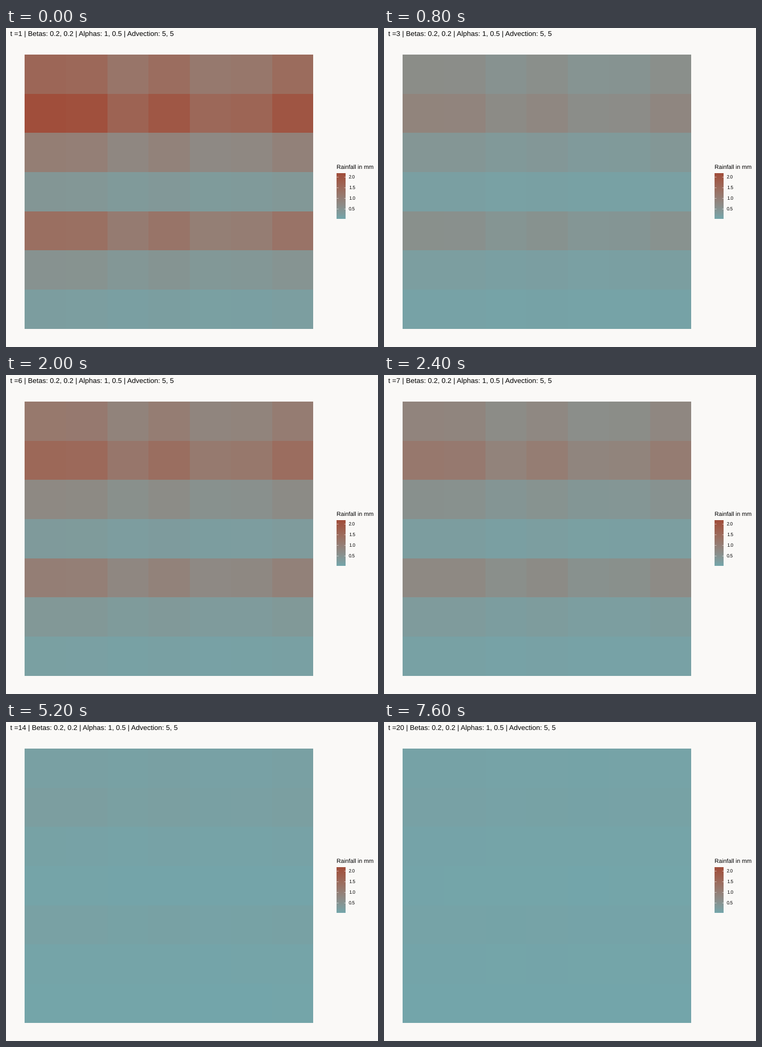
Write a matplotlib script that moves like this. It is 700x600 px and loops after 8 s.

```python
import numpy as np
import matplotlib.pyplot as plt
from matplotlib.animation import FuncAnimation
from matplotlib.colors import ListedColormap, to_rgb

W, H, DPI = 700, 600, 100
PT = 72 / DPI  # points per pixel
LOW, HIGH, BACK = "#73A5AA", "#A04D3A", "#FAF9F7"
N, STEPS = 7, 20

plt.rcParams["font.family"] = "Liberation Sans"
plt.rcParams["text.hinting"] = "no_hinting"

RGB_TO_XYZ = np.array([[0.4124, 0.3576, 0.1805],
                       [0.2126, 0.7152, 0.0722],
                       [0.0193, 0.1192, 0.9505]])
WHITE = RGB_TO_XYZ.sum(axis=1)
XYZ_TO_LAB = np.array([[0, 116, 0], [500, -500, 0], [0, 200, -200]])


def rgb_to_lab(rgb):
    rgb = np.asarray(rgb)
    linear = np.where(rgb > 0.04045, ((rgb + 0.055) / 1.055) ** 2.4, rgb / 12.92)
    return XYZ_TO_LAB @ np.cbrt(RGB_TO_XYZ @ linear / WHITE) - [16, 0, 0]


def lab_to_rgb(lab):
    roots = (lab + [16, 0, 0]) @ np.linalg.inv(XYZ_TO_LAB).T
    linear = np.clip((roots ** 3 * WHITE) @ np.linalg.inv(RGB_TO_XYZ).T, 0, 1)
    return np.where(linear > 0.0031308,
                    1.055 * linear ** (1 / 2.4) - 0.055, 12.92 * linear)


# Colours are blended in Lab space.
mix = np.linspace(0, 1, 512)[:, None]
lab_low, lab_high = (rgb_to_lab(to_rgb(c)) for c in (LOW, HIGH))
cmap = ListedColormap(lab_to_rgb(lab_low + mix * (lab_high - lab_low)))


def bump(x, centre, width):
    return np.exp(-((x - centre) / width) ** 2 / 2)


def wave(x, k, height, phase):
    return height * np.cos(2 * np.pi * k * x / N - phase)


# Rainfall, as a share of the scale: two rain bands down the rows, ripples
# across the columns.
i = np.arange(N)
rows = 0.09 + 0.93 * bump(i, 0.78, 0.9) + 0.57 * bump(i, 4.15, 0.5)
cols = (0.862 + wave(i, 1, 0.12, 0.36) + wave(i, 2, 0.067, -0.42)
        + wave(i, 3, 0.065, 2.14))
field = np.outer(rows, cols)


def intensity(t):
    """Exponential decay between a few moments, with a new shower at t = 6."""
    moments = [1, 5, 6, 8, 10, 14, 20]
    levels = [1, 0.157, 0.72, 0.39, 0.37, 0.085, 0.045]
    return np.exp(np.interp(t, moments, np.log(levels)))


fig = plt.figure(figsize=(W / DPI, H / DPI), dpi=DPI, facecolor=BACK)
ax = fig.add_axes([0, 0, 1, 1])
ax.axis("off")


def label(x, y, text, size):
    return ax.text(x, y, text, fontsize=size * PT, color="black", va="baseline")


def heat(x_edges, y_edges, values):
    return ax.pcolormesh(x_edges, y_edges, values, cmap=cmap, vmin=0, vmax=1,
                         antialiased=False, linewidth=0)


tiles = heat(np.ceil(np.linspace(35, 578, N + 1)),
             np.round(np.linspace(50, 565.8, N + 1)), field)

heat([622, 639], np.arange(273, 360), np.linspace(1, 0, 86)[:, None])
label(622, 266, "Rainfall in mm", 11)
for value in (2.0, 1.5, 1.0, 0.5):
    y = 359.5 - 40 * value
    for x in (622, 635.6):
        ax.plot([x, x + 3.4], [y, y], color="white", lw=0.6 * PT,
                solid_capstyle="butt")
    label(645, y + 3.4, f"{value:.1f}", 8.8)

title = label(8, 15, "", 13.2)
ax.set(xlim=(0, W), ylim=(H, 0))


def update(step):
    t = step + 1
    tiles.set_array(field * intensity(t))
    title.set_text(f"t ={t} | Betas: 0.2, 0.2 | Alphas: 1, 0.5 | Advection: 5, 5")
    return tiles, title


anim = FuncAnimation(fig, update, frames=STEPS, interval=400,
                     repeat=True, repeat_delay=0)
plt.show()
```
